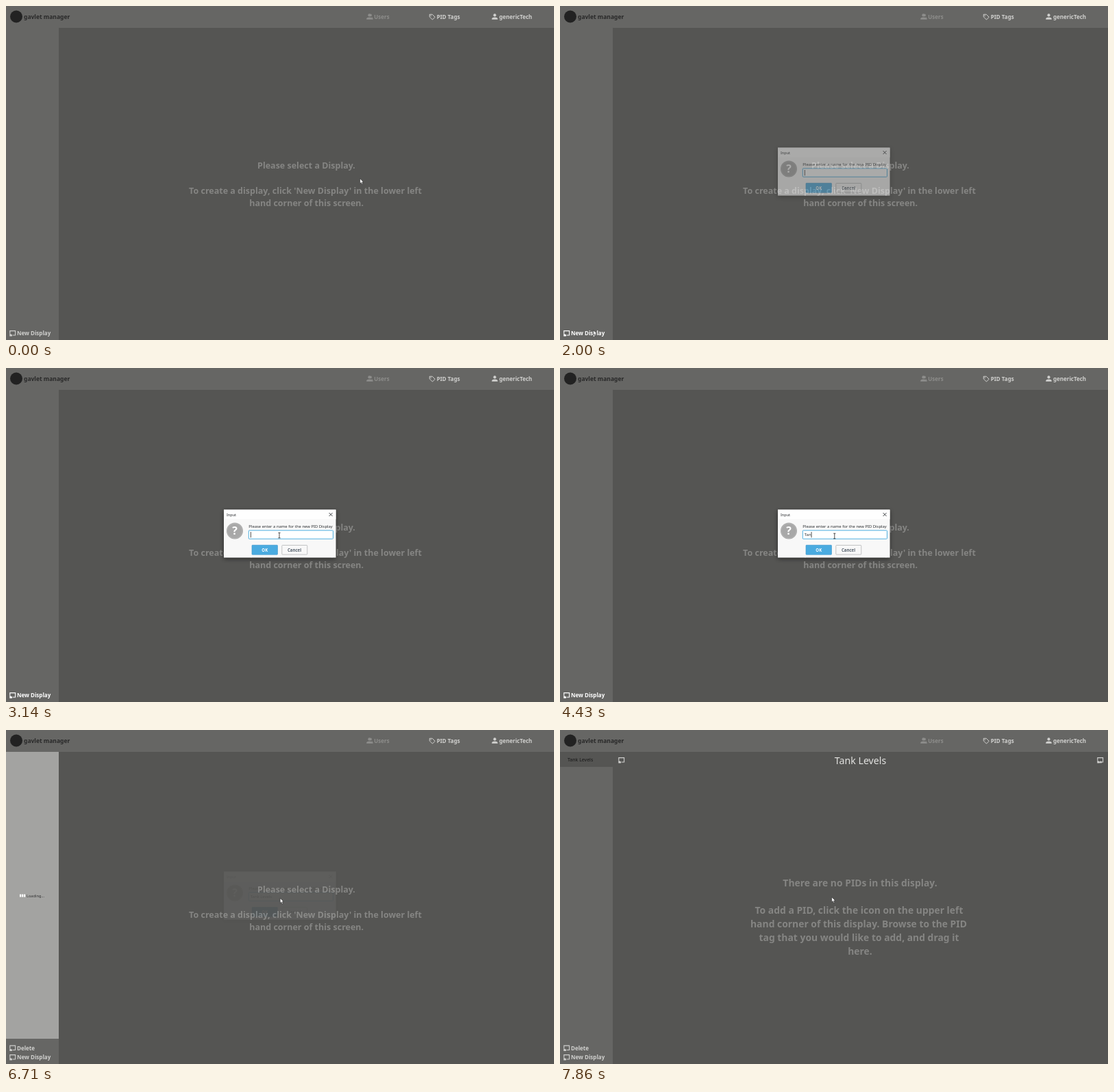
An HTML page for the animation above (8000 ms loop, 800 px wide and 489 px high).

```html
<!DOCTYPE html>
<html lang="en">
<head>
<meta charset="utf-8">
<title>Display manager</title>
<style>
  html, body { margin: 0; width: 100%; height: 100%; overflow: hidden; background: #555553; }
  svg { display: block; width: 100vw; height: 100vh; }
  text { font-family: "Noto Sans", "Open Sans", sans-serif; white-space: pre; }
  .bold { font-weight: 700; font-size: 8px; }
  .nav { color: #d0d0ce; }
  .off { color: #8d8d8b; }
  .hover { color: #fff; }
  .nav text, .off text { fill: currentColor; }
  .hint { font-weight: 700; text-anchor: middle; fill: #858583; }
  .small { font-size: 5.9px; fill: #2b2e31; }
  .button { font-weight: 700; font-size: 6.1px; text-anchor: middle; }
  .line { fill: none; stroke: currentColor; }
</style>
</head>
<body>
<svg viewBox="0 0 800 489" preserveAspectRatio="none">
  <defs>
    <symbol id="screen" width="10" height="10" overflow="visible">
      <path class="line" stroke-width="1.1" d="M.8 5.2V1.1H8.6V7.5H4.6"/>
      <path fill="currentColor" d="M.3 5.3 3.9 6.7V9H.3z"/>
    </symbol>
    <symbol id="person" width="10" height="10" overflow="visible">
      <circle cx="4.5" cy="2.4" r="2.1" fill="currentColor"/>
      <path fill="currentColor" d="M.3 8.8V7.5C.3 4.7 8.7 4.7 8.7 7.5V8.8z"/>
    </symbol>
    <filter id="shadow" x="-10%" y="-20%" width="120%" height="145%">
      <feDropShadow dx="0" dy="2" stdDeviation="3" flood-opacity=".5"/>
    </filter>
  </defs>

  <rect width="800" height="489" fill="#555553"/>
  <rect width="800" height="32" fill="#666664"/>
  <rect y="32" width="77" height="457" fill="#666664"/>

  <circle cx="15" cy="15.5" r="9" fill="#222"/>
  <text x="26" y="18.8" font-size="8.5" font-weight="700" fill="#292929">gavlet manager</text>
  <g class="off">
    <use href="#person" x="526" y="11"/>
    <path fill="currentColor" d="M532 11.4a2 2 0 0 1 0 4zM533.5 16.3q2.2.6 2.2 2.2v1.3h-1.4v-1.3q0-1.300-.8-2.200z"/>
    <text class="bold" x="537.3" y="18.8">Users</text>
  </g>
  <g class="nav">
    <path class="line" stroke-width="1" d="M618.300 12.300H622.300L626.300 16.300 622.500 20 618.300 15.800z"/>
    <circle cx="620.200" cy="14.200" r=".8" fill="currentColor"/>
    <text class="bold" x="628.700" y="18.800">PID Tags</text>
    <use href="#person" x="709" y="11"/>
    <text class="bold" x="720" y="18.800">genericTech</text>
  </g>

  <g id="empty" class="hint" font-size="12.5">
    <text x="438.500" y="238.300">Please select a Display.</text>
    <text x="437" y="275">To create a display, click 'New Display' in the lower left</text>
    <text x="438.700" y="293.300">hand corner of this screen.</text>
  </g>

  <g id="opened">
    <text x="438.500" y="49.500" font-size="14.2" text-anchor="middle" fill="#e2e2e0">Tank Levels</text>
    <g class="nav">
      <use href="#screen" x="85" y="39.500"/>
      <use href="#screen" x="784" y="39.500"/>
      <circle cx="789.500" cy="47" r="1.600" fill="currentColor"/>
    </g>
    <g class="hint" font-size="13.9">
      <text x="438" y="228.500">There are no PIDs in this display.</text>
      <text x="436.500" y="268.800">To add a PID, click the icon on the upper left</text>
      <text x="436" y="289">hand corner of this display. Browse to the PID</text>
      <text x="436.500" y="309.200">tag that you would like to add, and drag it</text>
      <text x="438" y="329.400">here.</text>
    </g>
  </g>

  <g id="loading">
    <rect y="32" width="77" height="420" fill="#a3a3a1"/>
    <path fill="#fff" d="M20 240.500h2.200v4H20zM23 240.500h2.200v4H23zM26 240.500h2.200v4H26z"/>
    <text x="30" y="244.500" font-size="5.65" fill="#333">Loading...</text>
  </g>
  <g id="item">
    <rect y="32" width="77" height="22" fill="#555553"/>
    <text x="11" y="46" font-size="7" fill="#171717">Tank Levels</text>
  </g>
  <g id="remove" class="nav">
    <use href="#screen" x="5" y="461"/>
    <text class="bold" x="16" y="468.800">Delete</text>
  </g>
  <g id="create" class="nav">
    <use href="#screen" x="5" y="474.500"/>
    <text class="bold" x="16" y="482.200">New Display</text>
  </g>

  <g id="dialog">
    <rect x="318" y="207.500" width="163.500" height="70" fill="#f8f8f8" filter="url(#shadow)"/>
    <rect x="318" y="207.500" width="163.500" height="14" fill="#fefefe"/>
    <g id="titlebar">
      <text class="small" x="322" y="216.900" style="font-size:5.5px">Input</text>
      <path stroke="#2b2e31" stroke-width=".9" d="M471.600 212l5 5M476.600 212l-5 5"/>
    </g>
    <circle cx="334" cy="238.500" r="12" fill="#a8a8a8"/>
    <circle cx="334" cy="238.500" r="11" fill="none" stroke="#bababa" stroke-width=".7"/>
    <text x="334" y="244.300" font-size="16" font-weight="700" text-anchor="middle" fill="#fff">?</text>
    <text class="small" x="354.300" y="233.600">Please enter a name for the new PID Display</text>
    <rect x="354.300" y="237.800" width="123.200" height="12.400" rx=".8" fill="#fff" stroke="#51b0e0"/>
    <text id="typed" class="small" x="356.800" y="246.200"></text>
    <rect id="caret" y="240" width=".8" height="8.300" fill="#222"/>
    <rect id="ok" x="359" y="259.300" width="37.500" height="14" rx=".8" stroke="#3d94c8" stroke-width=".6"/>
    <text class="button" x="377.800" y="268.500" fill="#fff">OK</text>
    <rect id="focus" x="360.200" y="260.500" width="35.100" height="11.600" fill="none" stroke="#174f75" stroke-width=".6" stroke-dasharray=".8 .8"/>
    <rect x="402.800" y="259.500" width="37" height="13.600" rx=".8" fill="#f8f8f8" stroke="#b4b6b8" stroke-width=".8"/>
    <text class="button" x="421" y="268.500" fill="#55606c">Cancel</text>
  </g>

  <path id="arrow" fill="#fff" stroke="#222" stroke-width=".6" stroke-linejoin="round"
        d="M0 0V7.400L1.700 5.900 2.900 8.700 4.200 8.100 3 5.400H5.200z"/>
  <path id="beam" fill="none" stroke="#222" stroke-width=".8" d="M-1.600-3.800H1.600M0-3.800V3.800M-1.600 3.800H1.600"/>
</svg>
<script>
  const LOOP = 8000;
  const $ = id => document.getElementById(id);
  const show = (id, on) => $(id).setAttribute("visibility", on ? "visible" : "hidden");

  // Pointer positions: time, x, y
  const pointer = [
    [0, 516.8, 252.5], [140, 514.8, 253], [290, 517, 252.5],
    [570, 500, 262], [710, 450, 295], [860, 360, 350], [1000, 260, 410],
    [1140, 150, 455], [1290, 80, 472], [1430, 52, 475], [1570, 48.7, 474.5],
    [2140, 52, 474], [2290, 58.5, 470.5], [2430, 100, 440], [2570, 185, 380],
    [2710, 285, 312], [2860, 362, 262], [3000, 396, 244], [3140, 399, 245],
    [3290, 400.8, 246], [6570, 400.2, 246], [7860, 396.7, 244.5]
  ];
  const name = "Tank Levels";
  const keys = [4000, 4140, 4430, 4570, 4860, 5000, 5140, 5430, 5570, 5710, 6000];
  const caretFlips = [2000, 2570, 3140, 3570, 4000, 6430];
  const fade = [[0, 0], [2000, .5], [2140, 1], [6710, .05], [6850, 0]];

  const passed = (times, t) => times.filter(s => s <= t).length;
  const latest = (steps, t) => steps[passed(steps.map(s => s[0]), t) - 1];

  function draw(t) {
    const done = t >= 7000;
    show("empty", !done);
    show("opened", done);
    show("loading", t >= 6710 && t < 6850);
    show("item", t >= 6850);
    show("remove", t >= 6710);
    $("create").setAttribute("class", t >= 1290 && t < 6710 ? "nav hover" : "nav");

    const pressed = t >= 6430;
    $("dialog").setAttribute("opacity", latest(fade, t)[1]);
    $("titlebar").setAttribute("opacity", t >= 6570 ? .5 : 1);
    $("ok").setAttribute("fill", pressed ? "#2980b9" : "#4aabe0");
    show("focus", pressed);

    const typed = $("typed");
    typed.textContent = name.slice(0, passed(keys, t));
    $("caret").setAttribute("x", 356.9 + typed.getComputedTextLength());
    show("caret", passed(caretFlips, t) % 2);

    const [, x, y] = latest(pointer, t);
    const beam = t >= 3000 && t < 6570;
    show("arrow", !beam);
    show("beam", beam);
    for (const id of ["arrow", "beam"]) $(id).setAttribute("transform", `translate(${x} ${y})`);
  }

  const start = performance.now();
  function tick() {
    draw((performance.now() - start) % LOOP);
    requestAnimationFrame(tick);
  }
  tick();
</script>
</body>
</html>
```
